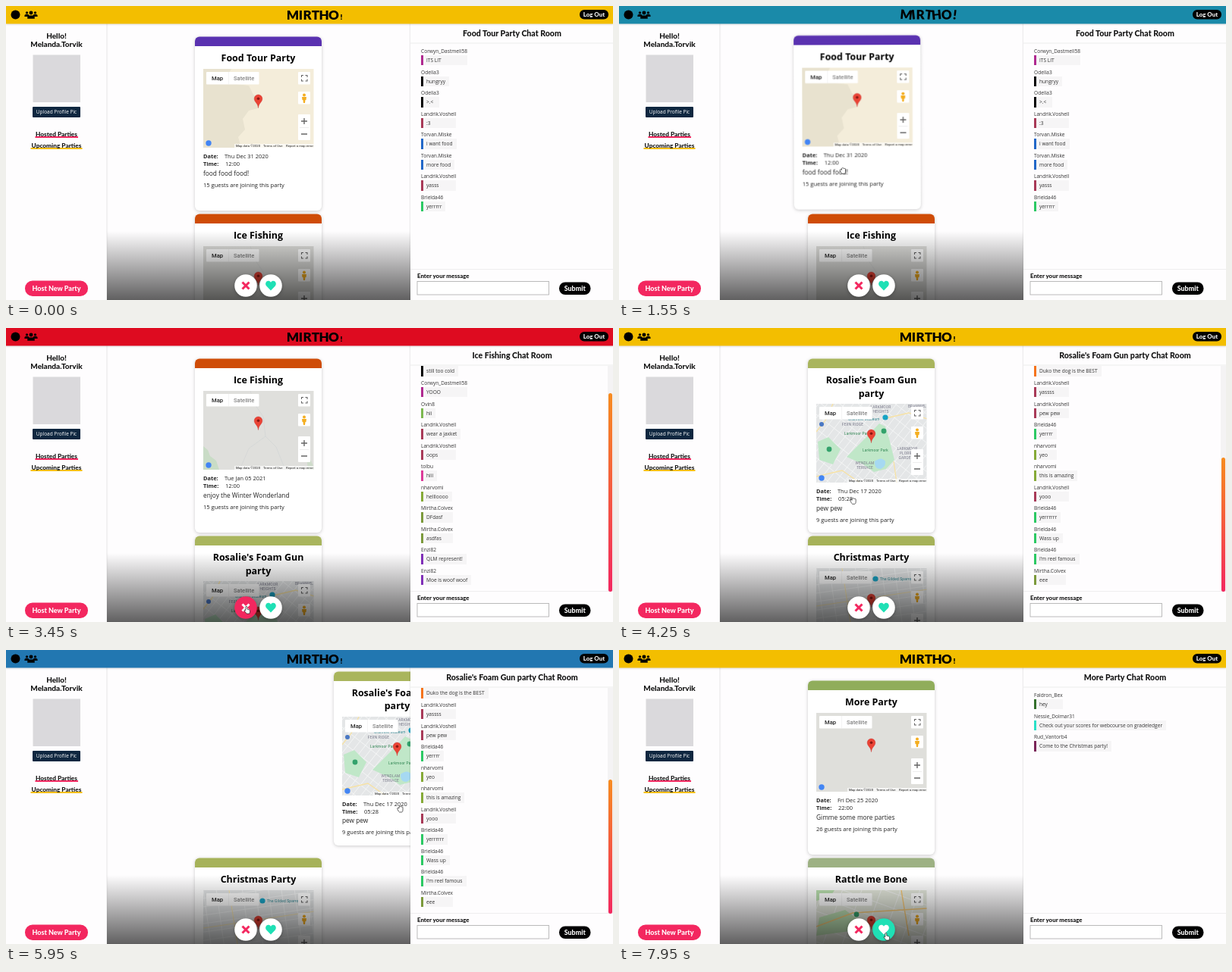
An HTML page that plays this animation: 800 by 388 pixels, repeating every 8000 ms.

```html
<!DOCTYPE html>
<html lang="en">
<head>
<meta charset="utf-8">
<title>Party finder</title>
<style>
  html, body { margin: 0; width: 100%; height: 100%; overflow: hidden; background: #fefdfe; }
  svg { display: block; }
  #stage, #overlay { position: absolute; left: 0; top: 0; }
  text { font-family: "Open Sans", sans-serif; fill: #222; }
  .ui { font-family: Lato, sans-serif; font-weight: 800; fill: #111; }
  .logo { font: 900 17px Lato, sans-serif; fill: #000; }
  .mid { text-anchor: middle; }
  .white { fill: #fff; }
  .title { font-size: 12.45px; font-weight: 700; fill: #000; }
  .map text { font-family: Roboto, sans-serif; }
  .place { font-size: 4.8px; text-anchor: middle; letter-spacing: .2px; }
  .card { filter: drop-shadow(0 1px 2px #0003); }
  .raised { filter: drop-shadow(0 1px 2px #0004); }
  #chats { position: absolute; left: 533px; top: 49.5px; width: 267px; height: 298px; overflow: hidden; }
  .chat { position: absolute; inset: 0; font: 6.6px "Open Sans", sans-serif; color: #333; }
  .list { position: absolute; top: 0; left: 14px; padding: 4.5px 0 5px; }
  .long .list { top: auto; bottom: 0; }
  .msg { width: fit-content; height: 27.55px; line-height: 11px; white-space: nowrap; }
  .bubble { position: relative; line-height: 13.4px; padding: 0 5px 0 7px; background: #f6f5f6; }
  .bar { position: absolute; left: 0; top: 0; width: 3px; height: 100%; }
  .track { position: absolute; right: 0; top: 0; width: 7px; height: 100%; background: #f4f3f4; }
  .thumb { position: absolute; left: 1px; right: 1px; bottom: 0; border-radius: 3px; background: linear-gradient(#f78c1f, #f3275f); }
</style>
</head>
<body>
<svg id="stage" width="800" height="388"></svg>
<div id="chats"></div>
<svg id="overlay" width="800" height="388"><path id="cursor" stroke="#222" stroke-width=".7" stroke-linejoin="round" fill="#fff"/></svg>
<script>
const LOOP = 8000, ROW = 234, PINK = '#f3275f', MINT = '#1fe0b5';
const $ = id => document.getElementById(id);

const text = (x, y, str, size, cls = '', extra = '') =>
  `<text x="${x}" y="${y}" font-size="${size}" class="${cls}" ${extra}>${str}</text>`;
const rect = (x, y, w, h, fill, extra = '') =>
  `<rect x="${x}" y="${y}" width="${w}" height="${h}" fill="${fill}" ${extra}/>`;
const circle = (x, y, r, fill, extra = '') =>
  `<circle cx="${x}" cy="${y}" r="${r}" fill="${fill}" ${extra}/>`;
const path = (d, fill, extra = '') => `<path d="${d}" fill="${fill}" ${extra}/>`;
const stroke = (d, color, width) => path(d, 'none', `stroke="${color}" stroke-width="${width}"`);
const place = (x, y, str, color = '#778') => text(x, y, str, 4.8, 'place', `style="fill:${color}"`);

// Street grid, tilted by the given angle
function streets(angle, gapX, gapY) {
  let d = '';
  for (let i = -150; i < 150; i += gapX) d += `M${i}-150V150`;
  for (let i = -150; i < 150; i += gapY) d += `M-150 ${i}H150`;
  return `<g transform="translate(73 52) rotate(${angle})">${stroke(d, '#f6f7f7', .8)}</g>`;
}

const terrain = {
  coast: rect(0, 0, 146, 104, '#f4edda') +
    path('M0 0H37L30 12 43 20 60 22 66 34 76 42 72 52 60 55 52 66 55 80 46 90 50 104H0Z', '#e8e2cf'),
  hills: rect(0, 0, 146, 104, '#dfdfdc') +
    path('M0 73L6 78 9 86 17 92 21 104H0Z', '#c9dcc6') + path('M136 88l6 4 4 10v2h-8z', '#cfdccb') +
    stroke('M62 0L68 18 79 34 82 60 96 74 108 104M82 60L60 76 48 104', '#d2d4d4', .7),
  plain: rect(0, 0, 146, 104, '#dfdfdb'),
  park: rect(0, 0, 146, 104, '#e4e6e7') + streets(38, 9, 15) +
    path('M83 26L91 30 96 46 103 74 92 86 76 90 62 80 40 70 52 58 68 42Z', '#c0e7c8') +
    path('M2 50L16 44 32 60 22 80 4 74Z', '#c0e7c8') +
    path('M77 76q9-7 14 0 1 7-6 10-9 0-8-10z', '#a6d9f2') +
    stroke('M0 37L12 22 22 0M0 96L34 88 57 104M88 20L122 12 146 20M102 76L106 104', '#f7e2a4', 1.3) +
    circle(7, 27, 3, '#4a78c4') + circle(91, 18, 3.6, '#18a3c4') + circle(89, 36, 3.4, '#34a26c') + circle(17, 60, 3.4, '#34a26c') +
    place(85, 6, 'LARKMOOR') + place(85, 12, 'HEIGHTS') + place(133, 5, 'BRAMWEL') +
    place(48, 29, 'FERN RIDGE') + place(63, 22, 'Bramwel Museum', '#27828e') +
    place(78, 63, 'Larkmoor Park', '#2d8450') + place(54, 41, 'Larkmoor Park', '#2d8450') +
    place(64, 80, 'WENDLAM') + place(64, 86, 'TERRACE') +
    place(120, 61, 'LARKMOOR') + place(120, 67, 'PLORRIS') + place(120, 73, 'GARDENS'),
  town: rect(0, 0, 146, 104, '#e4e6e7') + streets(-8, 17, 11) +
    stroke('M0 50L146 28M34 0L50 104', '#f7e6b4', 1.2) +
    circle(78, 14, 3.6, '#18a3c4') + place(108, 16, 'The Gilded Sparrows', '#27828e'),
  meadow: rect(0, 0, 146, 104, '#e4e8dc') + streets(20, 24, 19) +
    path('M0 0H24L18 9 0 14Z', '#b9dfae') + path('M4 36L38 26 54 38 44 54 0 60Z', '#bfe2b5') +
    stroke('M0 48L48 30 146 24M112 0L122 60', '#f5c878', 1.5) + circle(53, 32, 3.4, '#34a26c'),
};

function mapView(y, kind) {
  const button = (by, h) => rect(125, by, 16, h, '#fff', 'rx="1"');
  return `<svg class="map" x="260" y="${y}" width="145.5" height="104">${terrain[kind]}
    ${path('M72.5 51.5C72 45 67.2 44 67.2 39.3a5.3 5.3 0 0 1 10.6 0C77.8 44 73 45 72.5 51.5Z', '#ea4335', 'stroke="#c5221f" stroke-width=".4"')}
    ${circle(72.5, 39.3, 1.8, '#8a1712')}
    ${rect(4, 4, 69.5, 16.5, '#fff', 'rx="1"')}${rect(33.5, 4, .4, 16.5, '#e3e3e3')}
    ${text(11, 15, 'Map', 7.6, '', 'font-weight="500"')}${text(40, 15, 'Satellite', 7.6, '', 'style="fill:#666"')}
    ${button(4, 16.5)}${stroke('M129.5 11V8.5H132M134.5 8.5H137V11M137 13.5V16H134.5M132 16H129.5V13.5', '#666', 1.1)}
    ${button(30, 16.5)}${circle(133, 34.6, 2, '#f4ae20')}${path('M130 37h6l-.5 4h-1l-.5 4h-2l-.5-4h-1z', '#f4ae20')}
    ${button(60, 34)}${rect(127, 77, 12, .5, '#ddd')}${stroke('M129 69H137M133 65V73M129 86H137', '#666', 1.4)}
    ${rect(41, 99, 105, 5, '#ffffffb0')}${circle(7, 98, 3.7, '#4285f4')}
    ${text(43, 102.7, 'Map data ©2020', 4.3)}${text(79, 102.7, 'Terms of Use', 4.3)}${text(109, 102.7, 'Report a map error', 4.3)}
  </svg>`;
}

const parties = [
  { title: ['Food Tour Party'], strip: '#5a32b0', map: 'coast', date: 'Thu Dec 31 2020', time: '12:00', about: 'food food food!', guests: 15 },
  { title: ['Ice Fishing'], strip: '#cf4c07', map: 'hills', date: 'Tue Jan 05 2021', time: '12:00', about: 'enjoy the Winter Wonderland', guests: 15 },
  { title: ["Rosalie's Foam Gun", 'party'], strip: '#a9b55d', map: 'park', date: 'Thu Dec 17 2020', time: '05:28', about: 'pew pew', guests: 9 },
  { title: ['Christmas Party'], strip: '#a6b259', map: 'town', date: 'Fri Dec 25 2020', time: '12:00', about: '', guests: 15 },
  { title: ['More Party'], strip: '#90ad5b', map: 'plain', date: 'Fri Dec 25 2020', time: '22:00', about: 'Gimme some more parties', guests: 26 },
  { title: ['Rattle me Bone'], strip: '#9db183', map: 'meadow', date: '', time: '', about: '', guests: 9 },
];

function card(p, i) {
  const dy = (p.title.length - 1) * 17;
  return `<g id="card${i}" class="card">
    ${rect(249, 40.5, 167, 229.5, '#fff', 'rx="6"')}
    ${path('M249 53v-6.5a6 6 0 0 1 6-6h155a6 6 0 0 1 6 6V53z', p.strip)}
    ${p.title.map((line, n) => text(332.5, 73 + n * 17.5, line, 12.45, 'title mid')).join('')}
    ${mapView(83 + dy, p.map)}
    <g transform="translate(0 ${dy})">
      ${text(260, 201, 'Date:', 7.4, '', 'font-weight="700"')}${text(288, 201, p.date, 7.45)}
      ${text(260, 211, 'Time:', 7.4, '', 'font-weight="700"')}${text(289, 211, p.time, 7.45)}
      ${text(260, 223.5, p.about, 8.3)}${text(260, 238.5, p.guests + ' guests are joining this party', 7.5)}
    </g></g>`;
}

const barColors = {
  'Corwyn_Dastmell58': '#b02a90', 'Odella3': '#000', 'Landrik.Voshell': '#a83a58', 'Torvan.Miske': '#2268c8',
  'Brielda46': '#2cc964', 'Ovin8': '#7cb850', 'tolbu': '#dc3a98', 'nharvomi': '#86aa38', 'Mirtha.Colvex': '#7c9a3c',
  'Enzi82': '#8030b8', 'Faldron_Bex': '#34702c', 'Nessie_Dolmar31': '#2be0c8', 'Rud_Vantorb4': '#7a2458', 'Penna5': '#f5741c',
};
const chats = [
  { log: `Corwyn_Dastmell58|ITS LIT
Odella3|hungryy
Odella3|&gt;.&lt;
Landrik.Voshell|:3
Torvan.Miske|i want food
Torvan.Miske|more food
Landrik.Voshell|yasss
Brielda46|yerrrrr` },
  { thumb: 262, log: `Odella3|still too cold
Corwyn_Dastmell58|YOOO
Ovin8|hii
Landrik.Voshell|wear a jaxket
Landrik.Voshell|oops
tolbu|hiii
nharvomi|hellloooo
Mirtha.Colvex|DFdasf
Mirtha.Colvex|asdfas
Enzi82|QLM represent!
Enzi82|Moe is woof woof` },
  { thumb: 177, log: `Penna5|Duko the dog is the BEST
Landrik.Voshell|yassss
Landrik.Voshell|pew pew
Brielda46|yerrrr
nharvomi|yeo
nharvomi|this is amazing
Landrik.Voshell|yooo
Brielda46|yerrrrrr
Brielda46|Wass up
Brielda46|I'm reel famous
Mirtha.Colvex|eee` },
  { log: '' },
  { log: `Faldron_Bex|hey
Nessie_Dolmar31|Check out your scores for webcourse on gradeledger
Rud_Vantorb4|Come to the Christmas party!` },
];

function chat({ log, thumb }) {
  const messages = log.split('\n').filter(Boolean).map(line => {
    const [name, words] = line.split('|');
    return `<div class="msg">${name}<div class="bubble"><i class="bar" style="background:${barColors[name]}"></i>${words}</div></div>`;
  });
  const bar = thumb ? `<div class="track"><div class="thumb" style="height:${thumb}px"></div></div>` : '';
  return `<div class="chat ${thumb ? 'long' : ''}"><div class="list">${messages.join('')}</div>${bar}</div>`;
}

const person = (x, y, s) => `<g transform="translate(${x} ${y}) scale(${s})">${circle(0, -2.6, 2.6, '#000')}${path('M-5 5.5V4Q-5 1-2 1H2Q5 1 5 4V5.5Z', '#000')}</g>`;
const logo = [...'MIRTHO!'].map(c => `<g class="letter">${text(0, 0, c, 17, 'logo mid')}</g>`).join('');
const logoX = [378, 388.5, 397, 408, 419, 432, 442];

$('stage').innerHTML = `
  <defs><linearGradient id="fade" x2="0" y2="1"><stop stop-opacity="0"/><stop offset="1" stop-opacity=".62"/></linearGradient></defs>
  ${rect(0, 0, 800, 388, '#fefdfe')}
  ${parties.map(card).reverse().join('')}
  ${rect(133, 297, 400, 91, 'url(#fade)')}
  ${circle(316, 369, 14.8, '#fff', 'id="nope" class="raised"')}
  <path id="cross" d="M311.5 364.5l9 9m0-9l-9 9" stroke-width="3" fill="none"/>
  ${circle(349, 369, 14.8, '#fff', 'id="like" class="raised"')}
  <path id="heart" d="M349 375.5L343.2 369.5C340.5 366 343.5 362 346.5 362.8Q348.3 363.2 349 364.8 349.7 363.2 351.5 362.8C354.5 362 357.5 366 354.8 369.5Z"/>
  <g style="filter:drop-shadow(0 0 1px #0003)">${rect(-2, 20, 134.5, 372, '#fefdfe')}${rect(533, 20, 270, 372, '#fefdfe')}</g>
  ${text(66.5, 43, 'Hello!', 10, 'ui mid')}${text(66.5, 54, 'Melanda.Torvik', 10, 'ui mid')}
  ${rect(35.5, 64.5, 62.5, 62.5, '#dad9dc')}
  ${rect(35, 133, 63, 14, '#0f2740', 'rx="1"')}${text(66.5, 142.3, 'Upload Profile Pic', 6.5, 'white mid')}
  ${rect(38.5, 172, 56.5, 2, PINK)}${text(66.5, 172, 'Hosted Parties', 8.3, 'ui mid')}
  ${rect(32.5, 187, 68, 2, '#f5bf10')}${text(66.5, 187, 'Upcoming Parties', 8.3, 'ui mid')}
  ${rect(25, 362.5, 83, 20.5, PINK, 'rx="10"')}${text(66.5, 375.7, 'Host New Party', 9, 'ui white mid')}
  ${rect(533, 48.5, 267, 1, '#eeedee')}${rect(533, 347, 267, 1, '#eeedee')}
  ${text(667, 40, '', 10.6, 'ui mid', 'id="room"')}
  ${text(542, 359, 'Enter your message', 7.9, 'ui')}
  ${rect(542, 363.5, 173.5, 17.5, '#fff', 'stroke="#aaa" stroke-width=".8"')}
  ${rect(729, 364.5, 41.5, 16.5, '#000', 'rx="8"')}${text(749.8, 375.8, 'Submit', 8.9, 'ui white mid')}
  <rect id="header" width="800" height="23.5" style="filter:drop-shadow(0 1px 1px #0002)"/>
  ${circle(12.5, 11.5, 6, '#000')}
  ${person(27.5, 10.5, .62)}${person(38.5, 10.5, .62)}${person(33, 11.5, .95)}
  ${logo}
  ${rect(756, 5, 38, 12.5, '#000', 'rx="6"')}${text(775, 14, 'Log Out', 7.9, 'ui white mid')}`;
$('chats').innerHTML = chats.map(chat).join('');

const track = [
  [0, 400, 405], [450, 398, 373], [850, 384, 216], [1100, 384, 216], [1400, 314, 219], [2300, 67, 197], [2500, 60, 196],
  [3200, 317, 368], [3650, 317, 368], [4300, 309, 226], [4950, 309, 226], [5250, 337, 222], [5950, 520, 210],
  [6150, 640, 206], [6900, 352, 374], [8000, 352, 374],
];
const swipes = [
  { grab: 1400, release: 2350, gone: 2550, dir: -1, tilt: -1.8 },
  { grab: 3550, release: 3550, gone: 3850, dir: -1, tilt: 0 },
  { grab: 5250, release: 6100, gone: 6300, dir: 1, tilt: 0 },
  { grab: 7400, release: 7400, gone: 7700, dir: 1, tilt: 0 },
];
const headerCycle = [[0, '#f3be00'], [800, '#1a8aa9'], [2325, '#2277b1'], [3000, '#de0b20']], HEADER_LOOP = 3600;
const pointers = {
  arrow: 'M-2-4V4L0 2.3 1.4 5 2.6 4.4 1.3 1.9H4Z',
  grab: 'M-4 0C-5-2-3-2.2-2-1V-3q.8-1.6 1.6 0 .9-1.4 1.7.2 1.2-.9 1.7.6V1C3 3 2.2 4 1.5 4H-1.5C-3 3-3.5 1-4 0Z',
  hand: 'M-1.2 0q1-2 2 0V3l3 1q1 .5.8 2L4 9H0L-3 5q0-1.2 1-1l.8.8Z',
};

const smooth = u => { u = Math.min(1, Math.max(0, u)); return u * u * (3 - 2 * u); };

function cursorAt(t) {
  const n = Math.max(1, track.findIndex(k => k[0] >= t));
  const [t0, x0, y0] = track[n - 1], [t1, x1, y1] = track[n];
  const u = smooth((t - t0) / (t1 - t0));
  return [x0 + (x1 - x0) * u, y0 + (y1 - y0) * u];
}

function swipeOffset(s, t) {
  if (!s || t < s.grab) return [0, 0, 0];
  const [x0, y0] = cursorAt(s.grab), [x, y] = cursorAt(Math.min(t, s.release));
  const dx = x - x0 + s.dir * Math.max(0, t - s.release) * 1.2;
  return [dx, y - y0, s.tilt * Math.min(1, Math.abs(dx) / 200)];
}

function draw() {
  const t = performance.now() % LOOP;
  const top = swipes.filter(s => t >= s.gone).length;
  const active = swipes[top];

  parties.forEach((p, i) => {
    const [dx, dy, tilt] = i === top ? swipeOffset(active, t) : [0, 0, 0];
    const el = $('card' + i);
    el.style.display = i < top || i > top + 1 ? 'none' : '';
    el.setAttribute('transform', `translate(${dx} ${dy + (i - top) * ROW}) rotate(${tilt} 332.5 155)`);
  });
  [...$('chats').children].forEach((el, i) => el.style.display = i === top ? '' : 'none');
  $('room').textContent = parties[top].title.join(' ') + ' Chat Room';

  const [x, y] = cursorAt(t);
  const over = cx => Math.hypot(x - cx, y - 369) < 15;
  const nope = over(316), like = over(349);
  $('nope').setAttribute('fill', nope ? PINK : '#fff');
  $('cross').setAttribute('stroke', nope ? '#fff' : PINK);
  $('like').setAttribute('fill', like ? MINT : '#fff');
  $('heart').setAttribute('fill', like ? '#fff' : MINT);

  const dragging = active && t > active.grab && t < active.release;
  const onCard = x > 249 && x < 416 && y > 40;
  const shape = nope || like ? 'hand' : x > 133 && (dragging || onCard) ? 'grab' : 'arrow';
  $('cursor').setAttribute('d', pointers[shape]);
  $('cursor').setAttribute('transform', `translate(${x} ${y})`);

  const phase = t % HEADER_LOOP;
  $('header').setAttribute('fill', headerCycle.filter(k => k[0] <= phase).pop()[1]);

  const lively = smooth((t - 400) / 400) * smooth((2900 - t) / 500);
  document.querySelectorAll('.letter').forEach((el, i) => {
    const swing = lively * Math.sin(t / 180 + i * 2) * 7;
    const size = i === 6 ? .6 + .4 * lively : 1;
    el.setAttribute('transform', `translate(${logoX[i]} 17.5) rotate(${swing}) scale(${size})`);
  });
  requestAnimationFrame(draw);
}
draw();
</script>
</body>
</html>
```
